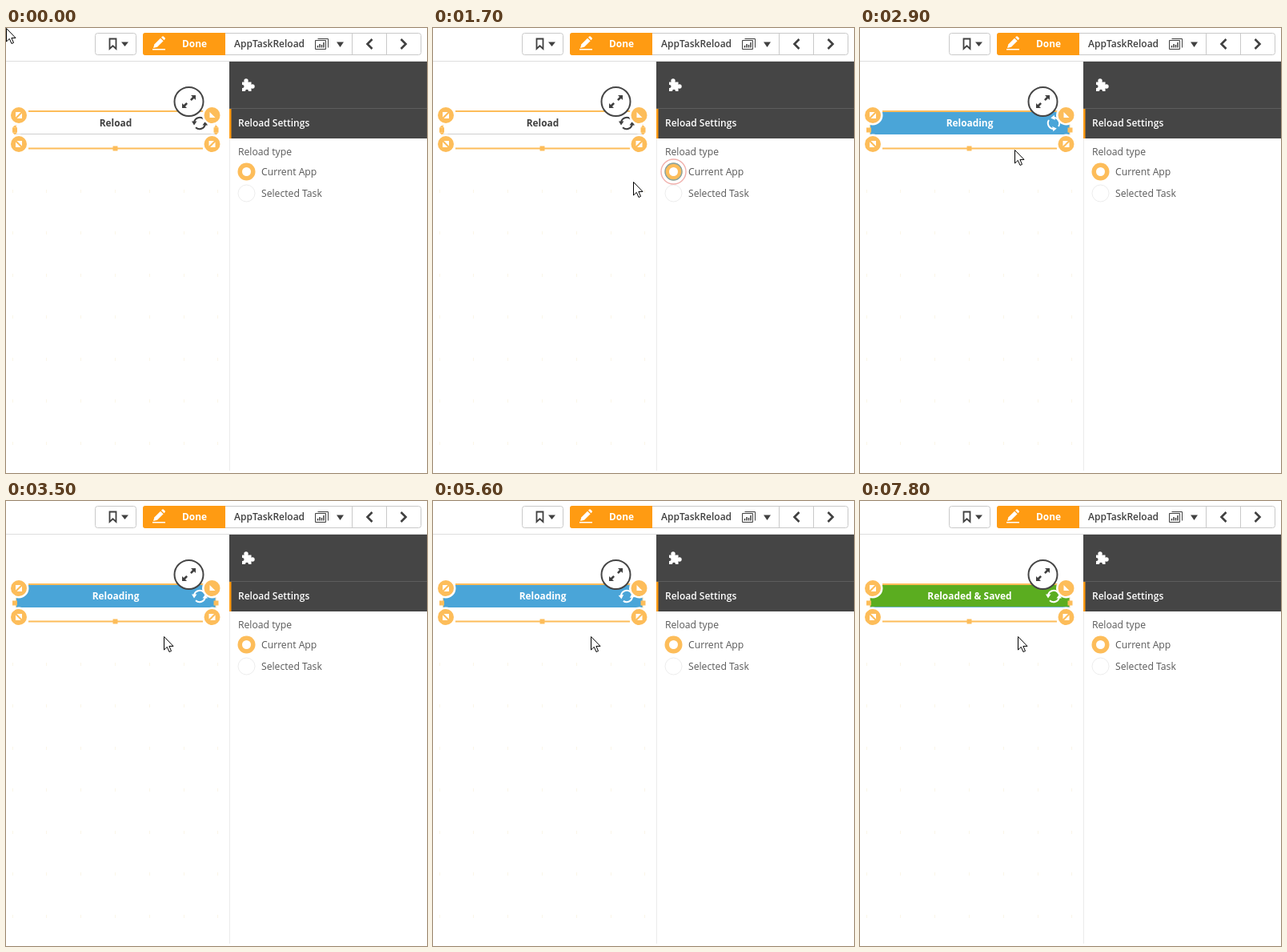
Animation, 526 px wide and 556 px high, one loop 8000 ms. Source, as an HTML page:

```html
<!DOCTYPE html>
<html lang="en">
<head>
<meta charset="utf-8">
<title>Reload button</title>
<style>
  html, body { margin: 0; width: 100%; height: 100%; overflow: hidden; background: #fff; }
  svg { display: block; }
  text { font: 12.2px "Open Sans", "Noto Sans", sans-serif; fill: #595959; }
  .semi { font-size: 12px; font-weight: 600; }
  .bold { font-size: 11.9px; font-weight: 700; }
  .box { fill: #fff; stroke: #c9c9c9; }
  .line { fill: none; stroke: #404040; }
  .amber { fill: #fdbd5a; }
</style>
</head>
<body>
<svg width="526" height="556" viewBox="0 0 526 556">
  <g id="grid" fill="#fbf6e8"></g>

  <!-- toolbar -->
  <path d="M0 41.5H526" stroke="#dedede"/>
  <rect class="box" x="111.5" y="6.5" width="51" height="27" rx="3"/>
  <path class="line" stroke-width="1.8" d="M129.5 13.5H137.5V26L133.5 22.3L129.5 26Z"/>
  <path d="M144 17.5H153L148.5 23Z" fill="#404040"/>
  <rect class="box" x="171.5" y="6.5" width="347" height="27" rx="3"/>
  <path d="M274 6H174a3 3 0 0 0-3 3V31a3 3 0 0 0 3 3H274Z" fill="#ff9b12"/>
  <g fill="#fff">
    <path d="M184 25L185.5 20.2L193 12.7L196.6 16.3L189 23.8Z"/>
    <path d="M194 11.8L195.3 10.6Q196.3 10 197.2 10.9L198.6 12.3Q199.3 13.2 198.6 14L197.5 15.3Z"/>
    <path d="M183 26H199V27.5H183Z"/>
  </g>
  <text class="bold" x="220" y="24" style="fill:#fff">Done</text>
  <text class="semi" x="285" y="24" style="fill:#404040">AppTaskReload</text>
  <path class="line" d="M389.5 13.5H402.5V24.5M386.5 15.5H399.5V26.5H386.5Z"/>
  <path class="line" stroke-width="1.5" d="M389.5 24.5V22M392 24.5V20M394.5 24.5V21M397 24.5V18"/>
  <path d="M413 17.5H422L417.5 24Z" fill="#404040"/>
  <path d="M432.5 7V33M475.5 7V33" stroke="#c9c9c9"/>
  <path class="line" stroke-width="2.6" d="M457.5 14L451.5 20L457.5 26M493.5 14L499.5 20L493.5 26"/>

  <!-- properties panel -->
  <path d="M279.5 42V553" stroke="#ebebeb"/>
  <path d="M279 42H526V138H279Z" fill="#454545"/>
  <path d="M279 100.5H526" stroke="#5d5d5d"/>
  <path d="M279 101H281.5V138H279Z" fill="#ff9b12"/>
  <g fill="#fff">
    <path d="M295 67.5H306.5V79H295Z"/>
    <circle cx="300" cy="66" r="2.7"/><circle cx="308" cy="73" r="2.7"/>
  </g>
  <g fill="#454545"><circle cx="295.5" cy="73" r="2"/><circle cx="301" cy="78.8" r="2"/></g>
  <text class="semi" x="290" y="123" style="fill:#fff">Reload Settings</text>
  <text x="290" y="159">Reload type</text>
  <text x="319" y="184">Current App</text>
  <text x="319" y="211">Selected Task</text>
  <circle cx="300.5" cy="206.500" r="10.500" fill="#fff" stroke="#ededed"/>
  <circle class="amber" cx="300.5" cy="179.5" r="11"/>
  <circle cx="300.5" cy="179.5" r="5.5" fill="#fff"/>
  <circle id="focus" cx="300.5" cy="179.5" r="10.5" fill="none" stroke="#86a3a3" stroke-width="1.3"/>
  <circle id="ring" cx="300.5" cy="179.5" r="15.500" fill="none" stroke="#f0b0ac" stroke-width="1.4"/>

  <!-- reload button -->
  <rect id="button" x="13" y="105" width="249" height="28"/>
  <path id="edge" d="M13 132.5H262"/>
  <text id="label" class="bold" x="137" y="123" text-anchor="middle"></text>
  <g id="icon" fill="none" stroke-width="2">
    <path d="M-7 -1A7.200 7.200 0 0 1 5 -5.200M7 1A7.200 7.200 0 0 1 -5 5.200"/>
    <path id="tips" stroke="none" d="M-10 -2.500H-3.500L-7 2.500ZM10 2.500H3.500L7 -2.500Z"/>
  </g>

  <!-- selection frame -->
  <path d="M28 104H247M28 150.500H246" stroke="#fdbd5a" stroke-width="1.8"/>
  <path class="amber" d="M133.500 147.500H139.500V153.500H133.500Z"/>
  <path d="M12.500 120V134M262 120V134" stroke="#fdd79c"/>
  <path class="amber" d="M8 124.500H14V130.500H8ZM259.500 124.500H265.500V130.500H259.500Z"/>
  <path id="sides" class="amber" d="M8 124.500L11 121.500L14 124.500ZM8 130.500L11 133.500L14 130.500ZM259.500 124.500L262.500 121.500L265.500 124.500ZM259.500 130.500L262.500 133.500L265.500 130.500Z"/>
  <g id="handles"></g>
  <circle cx="228.500" cy="92" r="18" fill="#fff" stroke="#454545" stroke-width="2"/>
  <g fill="#404040">
    <path d="M237 84V90L235 88L231.800 91L230 89.200L233 86L231 84Z"/>
    <path d="M220 100V94L222 96L225.200 93L227 94.800L224 98L226 100Z"/>
  </g>

  <g stroke="#000" fill="#fff" stroke-linejoin="round">
    <path id="arrow" d="M.5 .5V17L4.300 13.400L7 19.500L9.500 18.400L6.900 12.400H12Z"/>
    <path id="hand" d="M-1.500 13V1.500Q-1.500 0 0 0T1.500 1.500V8Q1.700 6.500 3 6.700T4.500 8.300Q5 7 6.200 7.500T7.500 9.300Q8.200 8.400 9.200 9T10 11V15.500Q9.800 17.500 8.500 19V22H0V19.500L-5 13.500Q-6 11.500-4.600 10.900T-1.500 13Z"/>
  </g>
</svg>
<script>
const $ = id => document.getElementById(id);
const show = (id, on) => $(id).style.display = on ? '' : 'none';

let dots = '';
for (let y = 204; y < 530; y += 52.5)
  for (let x = 8; x < 270; x += 42.8)
    dots += `<rect x="${x | 0}" y="${(y | 0) - 2}" width="1" height="4"/>`;
$('grid').innerHTML = dots;

const handle = (x, y, glyph) => `<g transform="translate(${x} ${y})">
  <circle r="12.5" fill="#fff"/><circle class="amber" r="10"/><path d="${glyph}" fill="#fff"/></g>`;
const slash = 'M-4 -4H2.500L-4 2.500ZM4 4H-2.500L4 -2.500Z';
const backslash = 'M4 -4H-2.500L4 2.500ZM-4 4H2.500L-4 -2.500Z';
$('handles').innerHTML = handle(16, 109, slash) + handle(257.500, 109, 'M-3 -4L4 3H-3Z')
  + handle(16, 145, backslash) + handle(257.500, 145, slash);

// pointer path: time, x, y
const path = [
  [0, 0, 0], [100, 12, 18], [500, 215, 225], [650, 262, 237], [900, 301, 182],
  [1500, 301, 182], [1700, 250, 192], [1800, 205, 188], [2100, 187, 127],
  [2300, 186, 118], [2700, 186, 118], [3000, 197, 169], [8000, 197, 169]
];

function pointerAt(t) {
  const i = path.findIndex(p => p[0] > t);
  const [a, b] = [path[i - 1], path[i]];
  const k = (t - a[0]) / (b[0] - a[0]);
  return [a[1] + (b[1] - a[1]) * k, a[2] + (b[2] - a[2]) * k];
}

// label, fill, text colour, bottom edge
const states = {
  idle: ['Reload', '#fff', '#404040', '#cfcfcf'],
  hover: ['Reload', '#454545', '#fff', '#6aa5c4'],
  busy: ['Reloading', '#4aa5d8', '#fff', '#4aa5d8'],
  done: ['Reloaded & Saved', '#5bad20', '#fff', '#67b5c8']
};

function draw(now) {
  const t = Math.floor(now % 8000 / 100) * 100;
  const [x, y] = pointerAt(t);
  const over = y > 105 && y < 133 && x < 262;
  const state = t >= 5800 ? 'done' : t >= 2800 ? 'busy' : over && t > 1800 ? 'hover' : 'idle';
  const [label, fill, ink, edge] = states[state];

  $('button').style.fill = fill;
  $('edge').style.stroke = edge;
  $('label').textContent = label;
  $('label').style.fill = $('tips').style.fill = $('icon').style.stroke = ink;
  const angle = t < 2800 ? 0 : (t - 3500) / 2150 * 360;
  $('icon').setAttribute('transform', `translate(242 119) rotate(${angle})`);

  show('sides', state === 'idle');
  show('focus', t >= 1000 && t < 2800);
  show('ring', t >= 1000 && t < 1900);

  const link = (over && t < 3000 && t > 1800) || (t >= 900 && t <= 1500);
  show('arrow', !link);
  show('hand', link);
  $(link ? 'hand' : 'arrow').setAttribute('transform', `translate(${Math.round(x)} ${Math.round(y)})`);
}

const start = performance.now();
(function frame() {
  draw(performance.now() - start);
  requestAnimationFrame(frame);
})();
</script>
</body>
</html>
```
